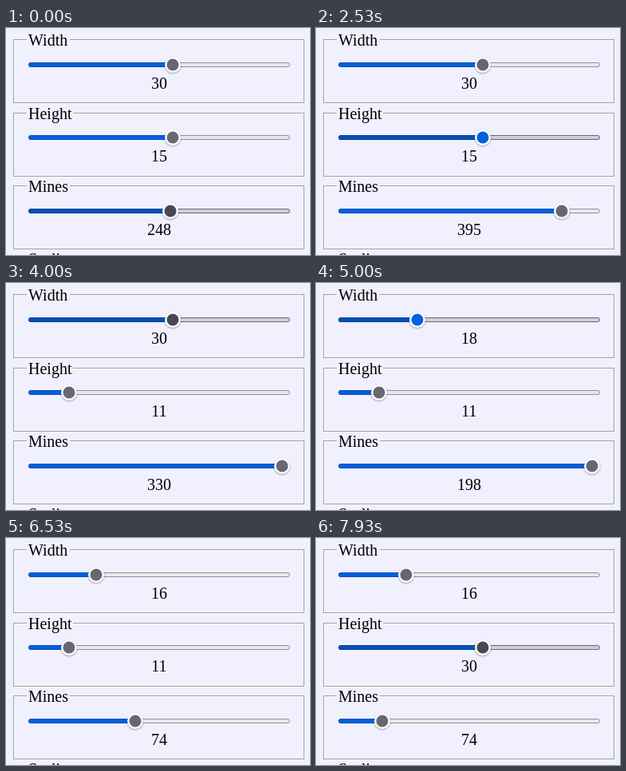
An HTML page for the animation above (8 s loop, 381 by 284 pixels).

```html
<!DOCTYPE html>
<html lang="en">
<head>
<meta charset="utf-8">
<title>Board settings</title>
<style>
  html, body { margin: 0; height: 100%; overflow: hidden; background: #f0f0ff; }
  svg { display: block; }
  text { font: 20px "Liberation Serif", "Times New Roman", serif; }
  .value { text-anchor: middle; }
  .thumb { stroke: #fff; stroke-width: 2.5; filter: drop-shadow(0 1.5px 1px rgba(0, 0, 0, .35)); }
</style>
</head>
<body>
<svg id="stage" width="381" height="284"></svg>
<script>
const FPS = 15, LOOP = 8000;
const stage = document.getElementById("stage");

function add(tag, attrs, text = "") {
  const el = document.createElementNS("http://www.w3.org/2000/svg", tag);
  set(el, attrs);
  el.textContent = text;
  return stage.appendChild(el);
}

function set(el, attrs) {
  for (const name in attrs) el.setAttribute(name, attrs[name]);
}

function makeSlider(name, top, mid, gap) {
  const frame = { width: 364, height: 79, fill: "none" };
  add("rect", { ...frame, x: 10.5, y: top + 1.5, stroke: "#fafafa" });
  add("rect", { ...frame, x: 9.5, y: top + .5, stroke: "#a0a0a0" });
  add("rect", { x: 26, y: top - 1, width: gap, height: 4, fill: "#f0f0ff" });
  add("text", { x: 28, y: top + 8 }, name);
  const bar = { x: 28.5, y: mid - 2.5, height: 5, rx: 2.5 };
  return {
    track: add("rect", { ...bar, width: 327 }),
    progress: add("rect", bar),
    thumb: add("circle", { class: "thumb", cy: mid, r: 8.75 }),
    value: add("text", { class: "value", x: 192, y: mid + 30 }),
  };
}

const sliders = [
  makeSlider("Width", 14, 46, 54),
  makeSlider("Height", 106, 137, 58),
  makeSlider("Mines", 197, 229, 54),
];
add("text", { x: 28, y: 296 }, "Scaling");

// Keyframes are [tick, value]; one tick is 1/15 s.
const widthKeys = [[68, 30], [75, 18], [77, 16]];
const heightKeys = [[39, 30], [40, 29], [44, 25], [45, 25], [56, 11], [109, 11], [118, 30]];
const mineKeys = [[19, 248], [20, 252], [27, 395], [87, 395], [88, 176], [96, 74]];

// Pointer visits: slider, enter, press, release, leave.
const visits = [
  [2, 0, 20, 28, 29],
  [1, 31, 38, 57, 58],
  [0, 60, 68, 78, 79],
  [2, 84, 88, 97, 98],
  [1, 104, 109, 119, 120],
];

function valueAt(keys, tick) {
  const i = keys.findIndex(key => key[0] > tick);
  if (i < 0) return keys[keys.length - 1][1];
  if (i === 0) return keys[0][1];
  const [t0, a] = keys[i - 1], [t1, b] = keys[i];
  return Math.round(a + (b - a) * (tick - t0) / (t1 - t0));
}

function drawSlider(index, tick, value, max, label) {
  const { track, progress, thumb, value: text } = sliders[index];
  const visit = visits.find(v => v[0] === index && tick >= v[1] && tick < v[4]);
  const pressed = visit && tick >= visit[2] && tick < visit[3];
  const x = Math.round(38 + 308 * (value - 5) / (max - 5));
  set(track, visit ? { fill: "#d0d0d7", stroke: "#676774" } : { fill: "#e9e9ed", stroke: "#8f8f9d" });
  set(progress, visit ? { fill: "#0250bb", stroke: "#054096" } : { fill: "#0060df", stroke: "#0250bb" });
  set(progress, { width: x - 28.5 });
  set(thumb, { cx: x, fill: pressed ? "#0060df" : visit ? "#484851" : "#676774" });
  text.textContent = label;
}

function draw(now) {
  const tick = Math.floor(now % LOOP * FPS / 1000 + .1) % 120;
  const width = valueAt(widthKeys, tick);
  const height = valueAt(heightKeys, tick);
  const rows = tick < 40 ? 15 : height; // the label starts out of step with its slider
  const maxMines = width * rows;
  const mines = Math.min(valueAt(mineKeys, tick), maxMines);
  drawSlider(0, tick, width, 50, width);
  drawSlider(1, tick, height, 50, rows);
  drawSlider(2, tick, mines, maxMines, mines);
}

let start;
function run(now) {
  start ??= now;
  draw(now - start);
  requestAnimationFrame(run);
}
draw(0);
requestAnimationFrame(run);
</script>
</body>
</html>
```
